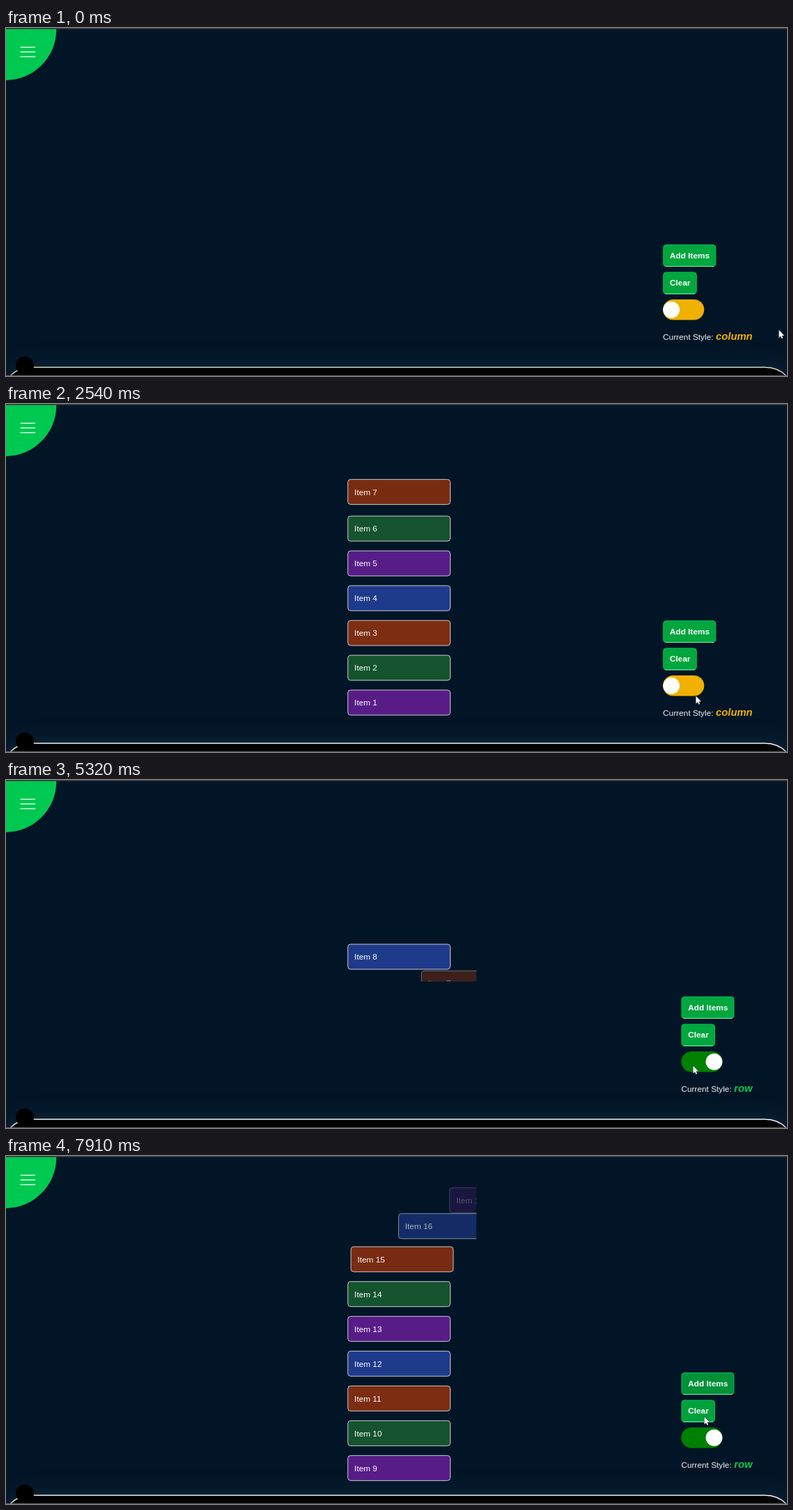
Animation, 1119 px wide and 500 px high, one loop 7.99 s. Source, as an HTML page with a canvas:

```html
<!DOCTYPE html>
<html lang="en">
<head>
<meta charset="utf-8">
<title>Animated list</title>
<style>
html, body { margin: 0; height: 100%; overflow: hidden; background: #011526; }
canvas { display: block; }
</style>
</head>
<body>
<canvas id="stage" width="1119" height="500"></canvas>
<script>
const ctx = document.getElementById('stage').getContext('2d');
const LOOP = 7990;
const SANS = '"Liberation Sans", Arial, sans-serif';
const TEXT_SCALE = .738;
const COLORS = ['#581c87', '#14532d', '#7c2d12', '#1e3a8a'];

// List geometry
const ITEM = { x: 489.8, w: 146.7, h: 36 };
const PITCH = 50, GAP = 13, CENTER = 254.5, PADDING = 16.5, TRAVEL = 200;

// Timeline in ms
const MOVE = 500;
const ADDED = [1120, 1275, 1430, 1585, 1705, 1905, 2075, 2230,
  6340, 6530, 6735, 6910, 7090, 7270, 7455, 7615, 7740];
const CLEARED = 8, CLEAR_START = 3394, CLEAR_STEP = 278;
const TOGGLE = 4050;
const ADD_HOVER = [[600, 2370], [6150, 7850]];
const CLEAR_HOVER = [[2830, 3760], [7890, 9000]];
const CURSOR = [
  [0, 1107.5, 434], [70, 1090, 385], [240, 1030, 345], [780, 980, 322], [1910, 981.5, 323],
  [2260, 981.5, 323], [2540, 988.5, 419.5], [2840, 977, 380], [3050, 970, 368],
  [3700, 972, 371], [3920, 975, 404.5], [4250, 975, 404.5], [4650, 984.5, 410.5],
  [5540, 984.5, 410.5], [6220, 998.5, 327], [7720, 998.5, 327], [7910, 1000.5, 374.5], [7990, 990, 370]
];

const clamp = v => Math.max(0, Math.min(1, v));
const lerp = (a, b, u) => a + (b - a) * u;
const ease = v => { const u = clamp(v); return u * u * (3 - 2 * u); };
const mix = (a, b, u) => `rgb(${a.map((v, i) => Math.round(lerp(v, b[i], u)))})`;

function box(x, y, w, h, r, fill, stroke, lineWidth = 1) {
  ctx.beginPath();
  ctx.roundRect(x, y, w, h, r);
  ctx.fillStyle = fill;
  ctx.fill();
  if (!stroke) return;
  ctx.strokeStyle = stroke;
  ctx.lineWidth = lineWidth;
  ctx.stroke();
}

function disc(x, y, r, fill) {
  ctx.beginPath();
  ctx.arc(x, y, r, 0, 7);
  ctx.fillStyle = fill;
  ctx.fill();
}

// The page is zoomed out, so text is set at its CSS size and scaled as a whole.
function label(text, x, y, color = '#fff', font = '16px') {
  ctx.save();
  ctx.translate(x, y);
  ctx.scale(TEXT_SCALE, TEXT_SCALE);
  ctx.font = `${font} ${SANS}`;
  ctx.fillStyle = color;
  ctx.fillText(text, 0, 0);
  ctx.restore();
}

function drawPage(t) {
  ctx.fillStyle = '#011526';
  ctx.fillRect(0, 0, 1119, 500);
  ctx.save();
  ctx.shadowColor = 'rgba(80,120,145,.22)';
  ctx.shadowBlur = 36;
  box(-7, 487.5, 1138, 100, 43, '#000');
  ctx.restore();
  box(-7, 487.5, 1138, 100, 43, '#000', mix([215, 218, 190], [245, 245, 245], clamp(t / 700)), 1.3);
  ctx.fillStyle = '#5c6064';
  ctx.fillRect(0, 499, 1119, 1);

  disc(-.8, 2, 73, '#00c951');
  ctx.fillStyle = '#3b3c3e';
  ctx.fillRect(0, 0, 1119, 1.6);
  ctx.fillStyle = '#e4f8eb';
  for (const y of [26.9, 33.7, 40.5]) ctx.fillRect(20.5, y, 21.5, 1.4);
  disc(27, 485, 13, '#000');
}

// Visible items with their state: p is 0 when away and 1 when settled.
function listItems(t) {
  const items = [];
  ADDED.forEach((start, i) => {
    const leaveAt = i < CLEARED ? CLEAR_START + CLEAR_STEP * i : Infinity;
    if (t < start || t >= leaveAt + MOVE) return;
    const leaving = t >= leaveAt;
    const p = leaving ? 1 - ease((t - leaveAt) / MOVE) : ease((t - start) / MOVE);
    const weight = leaving ? clamp((p - .45) / .55) ** 2 : clamp(p / .35);
    const gap = leaving ? lerp(1.2, GAP, weight) : GAP * clamp((p - .27) / .45);
    const row = (leaving ? leaveAt : start) > 3900;
    items.push({ i, p, leaving, weight, gap, row });
  });
  return items;
}

function drawList(t) {
  const items = listItems(t);
  if (!items.length) return;
  const total = items.reduce((sum, it) => sum + it.weight * PITCH, -GAP);
  const bottom = CENTER + total / 2;
  const staying = items.filter(it => !it.leaving);
  const leaving = items.filter(it => it.leaving);

  const edge = bottom - leaving.reduce((sum, it) => sum + it.weight * PITCH, 0);
  let y = edge;
  staying.forEach((it, k) => {
    y -= 37 + (k ? it.gap : 0);
    it.y = y;
  });
  const top = y;
  y = edge;
  [...leaving].reverse().forEach(it => {
    it.y = y + it.gap;
    y = it.y + 37;
  });

  ctx.save();
  ctx.beginPath();
  ctx.rect(453, top - PADDING, 221, bottom - top + 2 * PADDING);
  ctx.clip();
  for (const it of [...staying, ...leaving]) {
    const shift = TRAVEL * (1 - it.p);
    const x = ITEM.x + (it.row ? shift : 0);
    const itemY = it.y - (it.row ? 0 : shift);
    ctx.globalAlpha = it.p;
    box(x, itemY, ITEM.w, ITEM.h, 4, COLORS[it.i % 4], '#dcdce2', .9);
    label(`Item ${it.i + 1}`, x + 9.3, itemY + 22.2);
  }
  ctx.restore();
}

function hover(ranges, t) {
  return Math.max(...ranges.map(([from, to]) => Math.min(clamp((t - from) / 150), 1 - clamp((t - to) / 150))));
}

function button(text, x, y, w, hovered) {
  box(x + .5, y + .5, w - 1, 31, 4, mix([0, 166, 62], [0, 130, 54], hovered), '#05c95f', .9);
  ctx.fillStyle = '#7bf1a8';
  ctx.fillRect(x + 3, y + 31, w - 6, 1);
  label(text, x + 9.7, y + 20, '#fff', 'bold 16px');
}

function drawControls(t) {
  const row = t >= TOGGLE;
  const x = row ? 967.5 : 941.3;
  button('Add Items', x, 311, 76, hover(ADD_HOVER, t));
  button('Clear', x, 350.4, 48.5, hover(CLEAR_HOVER, t));

  const slide = ease((t - TOGGLE) / 290);
  box(x, 390, 59, 29.5, 14.75, row ? '#008000' : '#f0b100');
  disc(x + lerp(12, 47, slide), 404.8, 11.9 + 2 * Math.sin(Math.PI * slide), '#fff');

  label('Current Style:', x, 448, '#f4f4f4');
  label(row ? 'row' : 'column', x + 75.8, 448, row ? '#00c950' : '#f0b100', 'italic bold 20px');
}

function drawCursor(t) {
  const next = Math.max(1, CURSOR.findIndex(([time]) => time > t));
  const [t0, x0, y0] = CURSOR[next - 1], [t1, x1, y1] = CURSOR[next];
  const u = ease((t - t0) / (t1 - t0));
  ctx.save();
  ctx.translate(lerp(x0, x1, u), lerp(y0, y1, u));
  const arrow = new Path2D('M0 0V11L2.5 8.7 4.1 12.2 5.7 11.5 4.2 8H7.6Z');
  ctx.strokeStyle = '#111';
  ctx.lineWidth = 1;
  ctx.stroke(arrow);
  ctx.fillStyle = '#fff';
  ctx.fill(arrow);
  ctx.restore();
}

function frame() {
  const t = performance.now() % LOOP;
  drawPage(t);
  drawList(t);
  drawControls(t);
  drawCursor(t);
  requestAnimationFrame(frame);
}
frame();
</script>
</body>
</html>
```
